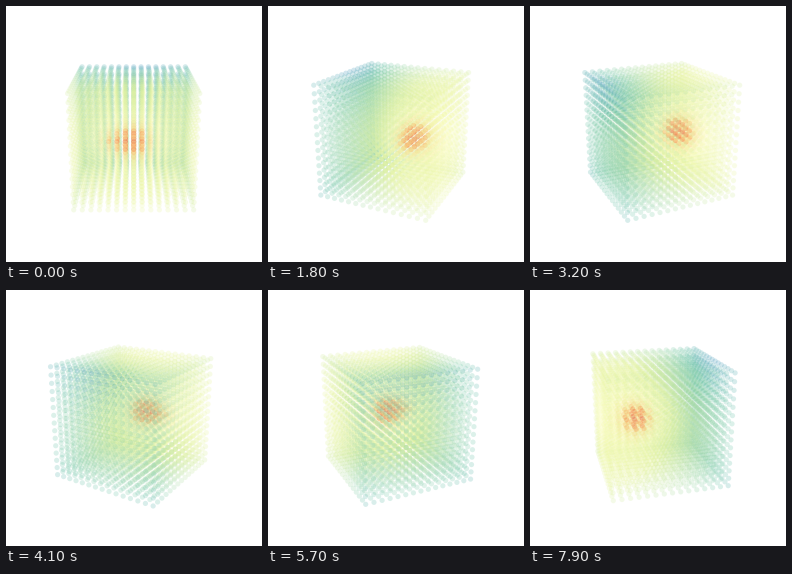
A matplotlib script that plays this animation: 256 by 256 pixels, repeating every 8000 ms.

```python
import matplotlib.pyplot as plt
import numpy as np
from matplotlib.animation import FuncAnimation

SIZE, DPI = 256, 100
FRAMES, INTERVAL = 80, 100
STEP = np.radians(3.6)
ELEV = np.radians(20)
FOCAL, DIST = 444, 8
CENTER = np.array([127.7, 127])

axis = np.linspace(-1, 1, 15)
x, y, z = (g.ravel() for g in np.meshgrid(axis, axis, axis, indexing="ij"))


def distance(px, py, pz):
    return np.sqrt((x - px) ** 2 + (y - py) ** 2 + (z - pz) ** 2)


def bump(r, width):
    return np.exp(-(r / width) ** 2)


# Hot core with a weak side lobe, cooling outwards to a cold upper edge.
r = distance(0.37, 0, 0)
level = 0.50 + 0.13 * r - 0.07 * x
level -= 0.34 * bump(r, 0.35) + 0.17 * bump(distance(0.37, -0.45, 0), 0.25)
level += 0.09 * bump(distance(-0.85, 0.1, 0.9), 0.7)
colors = plt.get_cmap("Spectral")(np.clip(level, 0.17, 1))
colors[:, 3] = 0.23 + 0.37 * np.clip((0.36 - level) / 0.1, 0, 1)


def project(angle):
    """Return pixel positions and depth of the turned grid."""
    c, s = np.cos(angle), np.sin(angle)
    lat, fwd = x * s + y * c, x * c - y * s
    depth = DIST - fwd * np.cos(ELEV) - z * np.sin(ELEV)
    up = z * np.cos(ELEV) - fwd * np.sin(ELEV)
    pos = CENTER + np.column_stack([lat, -up]) * (FOCAL / depth)[:, None]
    return pos, depth


fig = plt.figure(figsize=(SIZE / DPI, SIZE / DPI), dpi=DPI, facecolor="white")
ax = fig.add_axes([0, 0, 1, 1])
ax.set(xlim=(0, SIZE), ylim=(SIZE, 0))
ax.axis("off")
dots = ax.scatter(x, y, s=14, c=colors, linewidths=0)


def update(i):
    pos, depth = project(i * STEP)
    order = np.argsort(-depth, kind="stable")
    dots.set_offsets(pos[order])
    dots.set_facecolor(colors[order])
    return (dots,)


anim = FuncAnimation(fig, update, frames=FRAMES, interval=INTERVAL,
                     repeat=True, repeat_delay=0)
plt.show()
```
